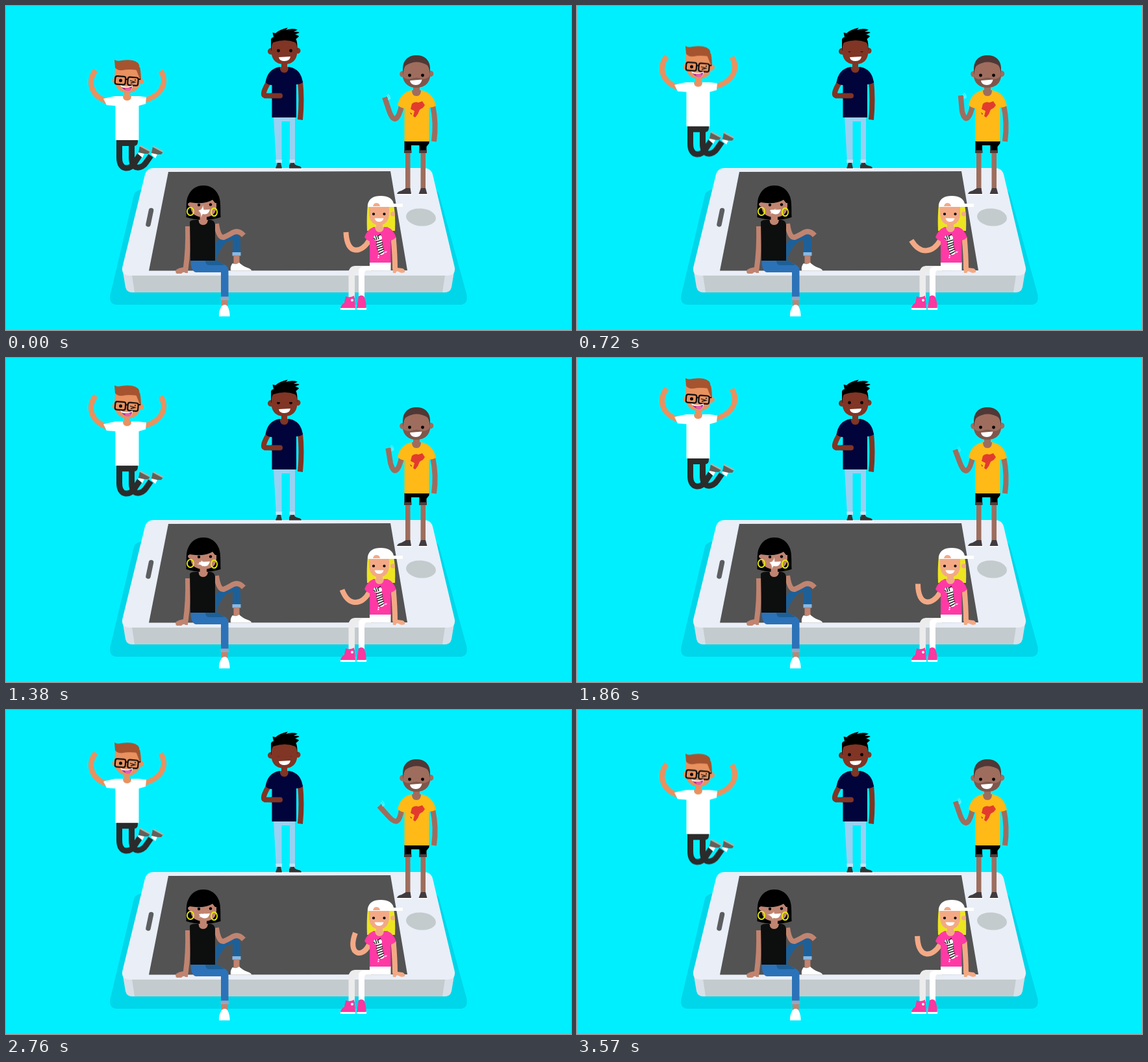
Write an HTML page without scripts that moves like this. It is 870 by 500 pixels and loops after 3.6 s.

```html
<!DOCTYPE html>
<html lang="en">
<head>
<meta charset="utf-8">
<title>Friends on a phone</title>
<style>
  html, body { margin: 0; width: 100%; height: 100%; overflow: hidden; background: #00efff; }
  svg { display: block; width: 870px; height: 500px; }
  .limb { fill: none; stroke-width: 8; }
  .white { fill: #fff; }
  .ginger { --skin: #e9915f; }
  .navy { --skin: #803525; }
  .amber { --skin: #9e6d5d; }
  .bob { --skin: #c08470; }
  .blonde { --skin: #f3a985; }
  .skin { fill: var(--skin); }
  .limb { stroke: var(--skin); }
  .jump { animation: jump 3.6s linear infinite; }
  .lid { transform-origin: 428px 65px; animation: blink .9s linear infinite alternate; }
  .glint { transform-box: view-box; transform-origin: 0 0; animation: glint 1.8s linear infinite; }
  .flick { animation: flick .36s linear infinite alternate; }
  @keyframes jump {
    50% { transform: translateY(-53.3px); }
    100% { transform: translateY(-15px); }
  }
  @keyframes blink { from { transform: scaleY(0); } to { transform: scaleY(1); } }
  @keyframes glint {
    from { transform: rotate(10deg) scale(1); }
    50% { transform: rotate(55deg) scale(.6); }
    to { transform: rotate(100deg) scale(1); }
  }
  @keyframes flick { from { opacity: .9; } to { opacity: .35; } }
</style>
</head>
<body>
<svg viewBox="0 0 870 500">
  <rect width="870" height="500" fill="#00efff"/>

  <g id="phone">
    <path fill="#00d6e9" d="M213 283H657Q664 283 667 291L709 444Q713 461 698 461H172Q157 461 161 444L197 291Q200 283 213 283Z"/>
    <path fill="#d8dfe7" d="M179 404L184 434Q186 442 194 442H676Q684 442 686 434L691 404Z"/>
    <path fill="#c4cbce" d="M194 415H676L672 442H198Z"/>
    <path fill="#e9eef7" d="M227 250H644Q654 250 657 260L691 404Q692 416 680 416H190Q178 416 179 404L214 260Q217 250 227 250Z"/>
    <path fill="#535353" d="M250 256L592 255L618 408L220 408.500Z"/>
    <path fill="none" stroke="#5b5d5f" stroke-width="7.500" stroke-linecap="round" d="M223.500 315.500L219 337"/>
    <ellipse cx="639" cy="326" rx="23" ry="13.500" fill="#c4cbcd" transform="rotate(5 639 326)"/>
  </g>

  <g class="ginger jump">
    <path class="limb" d="M155 147C130 138 125 116 138 99M212 146C241 138 249 118 238.500 100"/>
    <g fill="none" stroke="#2b2b2b" stroke-width="9">
      <path d="M174.500 209V234C174.500 256 193 252 198 242L206 230"/>
      <path d="M193.500 209V234C193.500 254 209 252 216 241L223 231"/>
    </g>
    <path fill="#2b2b2b" d="M170 206H203V209Q203 216 197 216H170Z"/>
    <g id="kick">
      <path class="white" d="M203 228L206 224L213 228L210 234Z"/>
      <path fill="#655f58" d="M206 216L222 224L219 228L213 228L204 226Z"/>
      <path stroke="#b3b4a8" stroke-width="2" d="M206 215.500L222 224"/>
    </g>
    <use href="#kick" x="20" y="1"/>
    <path class="white" d="M168 139H204L216 140.500L215 151L204.500 154V207H168.500V154L155 153L150 143Z"/>
    <path class="skin" d="M180 139H193Q193 146 186.500 146T180 139ZM182 130H191V141H182Z"/>
    <circle class="skin" cx="168" cy="115" r="4.500"/>
    <circle class="skin" cx="207.500" cy="116" r="4.500"/>
    <path fill="#b8623d" d="M196 95H206Q209 105 207 116L201 116Z"/>
    <path class="skin" d="M168 95H202L207 112Q207 133 188 134Q168 133 167 113Z"/>
    <path fill="#a5542f" d="M167 83Q171 86 178 84Q201 81 205 91Q206 95 203 99Q188 97 180 99Q171 100 168 95Z"/>
    <path fill="#a5542f" d="M200 97L206 94L208 114L205.500 111Z"/>
    <g fill="none" stroke="#111" stroke-width="2.200">
      <rect x="168" y="108.500" width="16" height="12.500" rx="3" transform="rotate(5 176 115)"/>
      <rect x="187.500" y="110" width="16" height="12.500" rx="3" transform="rotate(5 195 116)"/>
      <path d="M184 113L188 113.500M203 113L207 113"/>
      <path stroke-width="1.300" d="M191 115L198.500 117.500L192 119M198 114.500L200 114"/>
    </g>
    <circle cx="176.500" cy="115" r="2.500"/>
    <path class="white" d="M176 122Q186 127 195 122Q195 131 188 131Q179 130 176 122Z"/>
    <path fill="#a32b84" d="M177.500 125Q186 128 194 124Q194 131 188 131Q181 130 177.500 125Z"/>
    <path fill="#e85eae" d="M183 127Q188 125 193 127Q192 131 188 131Q184 131 183 127Z"/>
  </g>

  <g class="navy">
    <path class="limb" d="M453 116Q456 145 453 175.500"/>
    <path class="limb" stroke-linejoin="round" d="M404 118Q393 137 399 138.500H422" stroke-linecap="round" stroke-width="7"/>
    <path fill="#99d1f2" d="M412 171H445V242H437V178H424.500V242H416Z"/>
    <path fill="#bde3f8" d="M415.500 237H425V242H415.500ZM436.500 237H445V242H436.500Z"/>
    <path class="white" d="M414 250H426V252H414ZM436 250H456V252H436Z"/>
    <path class="skin" d="M437.500 242H444V246H437.500Z"/>
    <path fill="#333" d="M415 250.500L418 242H423L425 250.500ZM436 250.500V245L443 242Q445 246 451 247Q455 248 455 250.500Z"/>
    <path fill="#00043b" d="M421 94H436Q454 97 457 118Q453 121 447 121V172H409.500V122Q404 122 399.500 118Q403 97 421 94Z"/>
    <path class="limb" stroke-width="7" stroke-linecap="round" d="M409 138.500H422"/>
    <path class="skin" d="M424 87H433V94H435Q435 103 428.500 103T421.500 94H424Z"/>
    <circle class="skin" cx="408" cy="70" r="5"/>
    <circle class="skin" cx="449" cy="69" r="4.500"/>
    <path d="M408 69L408 55Q407 49 412 48L410.500 41L415 42Q421 36 434 33.500L431 37Q440 34 449 36.500L443 40Q449 39 452 41L445 44Q450 45 451 47L446.500 51Q449 56 448.500 68Z"/>
    <path class="skin" d="M408.500 67Q409 57 412 56Q430 50 445 56Q448.500 58 448.500 69C448.500 84 440 90 428.500 90S408.500 84 408.500 69Z"/>
    <circle cx="419.500" cy="69" r="2.400"/>
    <circle cx="438.500" cy="69" r="2.400"/>
    <path class="skin lid" d="M415 65H442V72H415Z"/>
    <path class="white" d="M420 79L438 78Q437 85 429 85T420 79Z"/>
  </g>

  <g class="amber">
    <path class="limb" d="M657 153Q663 180 659 209"/>
    <path class="limb" stroke-width="7.500">
      <animate attributeName="d" dur="3.6s" repeatCount="indefinite" calcMode="spline"
        keySplines=".39 .575 .565 1;.47 0 .745 .715;.39 .575 .565 1;.47 0 .745 .715"
        values="M609 154C604 176 597 182 590 162L583 141;M609 154C604 176 597 180 593 162L591 138;M609 154C604 176 597 182 590 162L583 141;M609 154C606 173 601 178 588 163L574.500 148;M609 154C604 176 597 182 590 162L583 141"/>
    </path>
    <g>
      <animateTransform attributeName="transform" type="translate" dur="3.6s" repeatCount="indefinite" calcMode="spline"
        keySplines=".39 .575 .565 1;.47 0 .745 .715;.39 .575 .565 1;.47 0 .745 .715"
        values="0 0;8 -2;0 0;-9 4;0 0"/>
      <path class="flick" fill="none" stroke="#c9faff" d="M588 136Q592 139 591 144M586.500 138Q590 141 589 145"/>
    </g>
    <path class="skin" d="M615 225H622.500V284H615ZM638.500 225H646V284H638.500Z"/>
    <path d="M613.500 208H651.500V212L647.500 217V224H636.500V215H624V224H613.500Z"/>
    <path fill="#4a3d3c" d="M613 222.500H624.500V227H613ZM636 222.500H648V227H636Z"/>
    <path class="white" d="M602 289H625V291.500H602ZM635 289H649V291.500H635Z"/>
    <path fill="#423b3d" d="M602 290Q603 286 609 285L616 281H622.500L624 290ZM635.500 290L639 281H646L648.500 290Z"/>
    <path fill="#ffba17" d="M624 130H640Q658 134 662 154Q657 157 651.500 157V209H613.500V158Q607 157 603 153Q607 134 624 130Z"/>
    <path fill="#e23b2e" d="M625 151Q629 147 635 149L641 147L645 153L642 157L637 160L634 167L630 172L627 170L629 162L623 159Z"/>
    <path fill="#a52e24" d="M622 164L625 166L624 168Z"/>
    <path class="skin" d="M627 122H637V130H639Q639 139 632 139T625 130H627Z"/>
    <circle class="skin" cx="611" cy="105" r="4.800"/>
    <circle class="skin" cx="653.500" cy="104.500" r="4.800"/>
    <path fill="#4f3836" d="M611 106V97C611 83 620 76 632 76S653 83 653 97V106Z"/>
    <path class="skin" d="M611 108Q612 93 617 91Q632 82 648 91Q652 94 653 106C653 120 643 126 632 126S612 120 611 108Z"/>
    <path fill="#80564b" d="M611 108Q613 113 622 113Q632 108 642 113Q651 112 653 106C653 120 643 126 632 126S612 120 611 108Z"/>
    <circle cx="621.500" cy="107" r="2.400"/>
    <circle cx="641.500" cy="107" r="2.400"/>
    <path class="white" d="M622 115L640.500 113.500Q639 122 631 122T622 115Z"/>
  </g>

  <g class="bob">
    <path fill="none" stroke="#1d6098" stroke-width="12" d="M314 398Q328 361 341 357Q355 351 355 364V381"/>
    <path fill="#8db7e0" d="M348.500 380H361.500V385.500H348.500Z"/>
    <path class="skin" d="M350.500 385.500H359.500V398H350.500Z"/>
    <path class="white" d="M346 408.500Q345 401 349 397Q354 400 359 396Q364 401 372 404Q378 406 378 408.500Z"/>
    <path class="limb" d="M280 340Q281 375 276.500 407"/>
    <path class="skin" d="M274 403L280 405V412H276Q274 409 270 413H263Q260 411 262 407Q266 404 274 403Z"/>
    <path class="limb" stroke-width="7.500" d="M324 336Q327 358 335 357Q340 355 347 351Q357 344 366 354"/>
    <path fill="#2b72b8" d="M284.500 392H322L338 400Q342.500 402 342.500 410V450H331V411H292Q284.500 409 284.500 392Z"/>
    <path fill="#1d6098" d="M307 392H324L336 400H313Q307 400 307 392Z"/>
    <path fill="#91a9c2" d="M330.500 448.500H343V454H330.500Z"/>
    <path class="skin" d="M332 454H341.500V464H332Z"/>
    <path class="white" d="M328 479Q327 472 332 463Q337 459 341 463Q345 471 344.500 479Z"/>
    <path fill="#0d0e0e" d="M283 333Q285 330 291 330H315Q321 331 322 337V393H284Z"/>
    <path d="M277.500 326C278 310 277 301 280 294Q287 277 304 277T328 294C331 302 330 316 330.500 326Q318 330 304 330T277.500 326Z"/>
    <path class="skin" d="M298.500 322H309V330H311Q310 338 303.500 338T296.500 330H298.500Z"/>
    <path class="skin" d="M283 303Q305 307 318 297L324 301V309C324 321 316 326 304.500 326S285 321 284 310Q280 309 280 305Z"/>
    <path d="M280 300Q283 283 304 280Q323 282 327 304L322 304L318 299Q309 305 294 304Z"/>
    <circle cx="297" cy="307" r="2.200"/>
    <circle cx="315" cy="306.500" r="2.200"/>
    <g fill="none" stroke="#e9f000" stroke-width="1.800">
      <ellipse cx="284" cy="317" rx="5" ry="6.200"/>
      <ellipse cx="320.500" cy="318" rx="4.600" ry="6.200"/>
    </g>
    <path class="white" d="M297 315L314 314Q312 321.500 306 321.500T297 315Z"/>
    <g transform="translate(302 317)">
      <path class="white glint" d="M0-10Q.8-1 6 0Q.8 1 0 10Q-.8 1-6 0Q-.8-1 0-10Z"/>
    </g>
  </g>

  <g class="blonde">
    <path fill="#ece522" d="M557 306H597Q600 325 599 347H556Q555 325 557 306Z"/>
    <path class="limb" stroke-width="6.500">
      <animate attributeName="d" dur="3.6s" repeatCount="indefinite" calcMode="spline"
        keySplines=".39 .575 .565 1;.47 0 .745 .715;.39 .575 .565 1;.47 0 .745 .715"
        values="M559 362C548 381 525 386 523.500 349;M559 362C549 379 530 386 514.500 362;M559 362C548 381 525 386 523.500 349;M559 362C549 384 525 378 538 344;M559 362C548 381 525 386 523.500 349"/>
    </path>
    <path class="limb" d="M596.500 357Q599 385 599 406"/>
    <path class="skin" d="M595 403L603 404L611 405Q615 407 614 411L609 412L602 409L600 412H596Z"/>
    <path fill="#ececec" d="M562 401H537Q527.500 402 527.500 412V450H537V411H562Z"/>
    <path class="white" d="M560 395H592.500V408H556Q552 408 552 413V450H543V409Q543 402 552 402H560Z"/>
    <path class="white" d="M515 465H538V469H515ZM540 465H555V469H540Z"/>
    <path fill="#fa389f" d="M515 466Q516 461 521 458L523 448Q529 451 536 447L538 466ZM540 466L543 448Q547 445 551 448Q555 456 554.500 466Z"/>
    <circle class="white" cx="533" cy="454" r="2"/>
    <path fill="#ff3aa5" d="M566 341H587Q597 345 600.500 357Q597 361 592.500 362V396H560V363Q555 361 552 357Q556 345 566 341Z"/>
    <g fill="none">
      <path stroke="#fff" stroke-width="8" stroke-linecap="round" stroke-linejoin="round" d="M570 358L575 358L575 369L578 380"/>
      <path stroke="#222" stroke-width="1.400" d="M566 358L569 361M569 354L571 361M572 354L574 360M570 364L579 361M570 368L580 365M571 372L580 368M571 375L581 372M573 379L582 375M574 383L582 379M573 355L577 352"/>
      <path stroke="#fff" stroke-width="2" stroke-dasharray="2 1" d="M574 384L573 390M581 381L587 379"/>
    </g>
    <path class="skin" d="M570 334H580V341H582Q581 349 575 349T568 341H570Z"/>
    <circle class="skin" cx="595.500" cy="321" r="3.500"/>
    <path class="skin" d="M559 309H590V319C590 333 583 338 574.500 338S559 333 559 319Z"/>
    <path class="white" d="M557 310V306Q560 293 577 293T597 305H611V310Z"/>
    <path class="skin" d="M565 309Q566 304 570.500 304T576 309Z"/>
    <circle cx="566" cy="321" r="2.100"/>
    <circle cx="582.500" cy="321" r="2.100"/>
    <path class="white" d="M567.500 327.500H581.500Q580 333 574.500 333T567.500 327.500Z"/>
  </g>
</svg>
</body>
</html>
```
